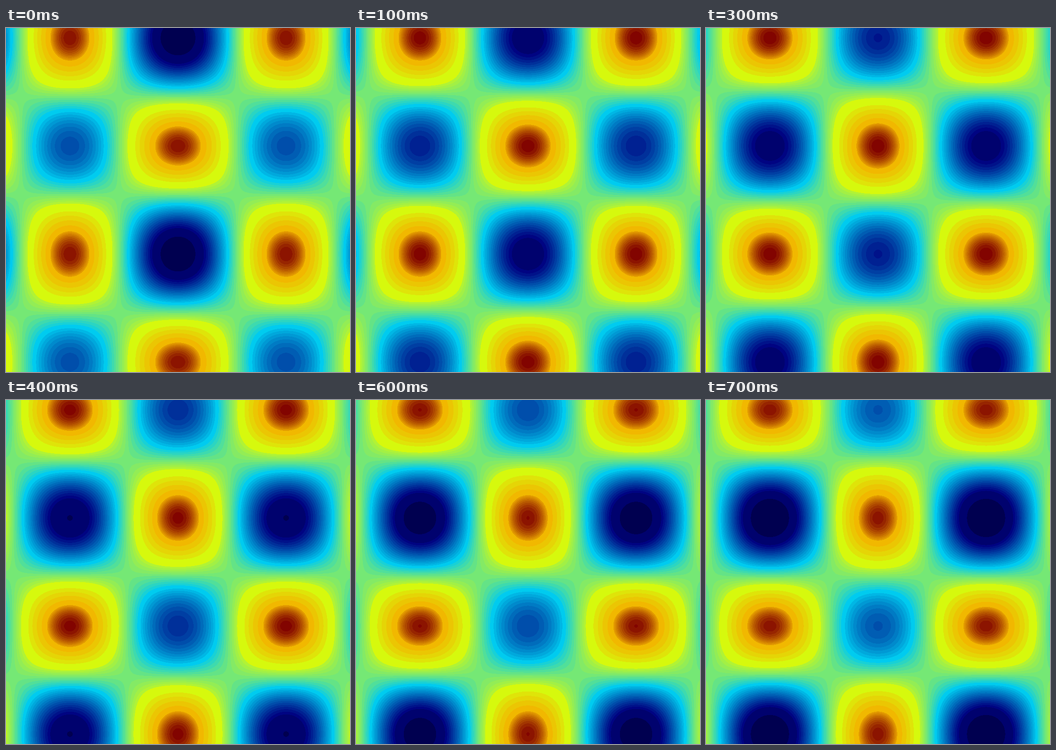
Write a matplotlib script that moves like this. It is 748 px wide and 748 px high and loops after 0.8 s.

```python
import numpy as np
import matplotlib.pyplot as plt
from matplotlib.animation import FuncAnimation
from matplotlib.colors import BoundaryNorm, ListedColormap, to_rgb

SIZE, DPI = 748, 100
FRAMES, INTERVAL = 8, 100
HALF_WIDTH = 5

# Key colours along the field value.
STOPS = {
    -1.25: "#000050",
    -0.975: "#000482",
    -0.31: "#00cbf0",
    0.0: "#76e875",
    0.3: "#d6fa0e",
    0.78: "#f3b400",
    0.99: "#820400",
}


def band_levels():
    """Evenly spaced bands within each colour range, finest near the red peaks."""
    return np.concatenate([
        [-1.5, -1.168],
        np.arange(-1.0, -0.32, 0.05),
        np.arange(-0.27, 0, 0.05),
        np.linspace(0.02, 0.21, 5),
        np.arange(0.4, 0.75, 0.1),
        np.linspace(0.8, 1.0, 11),
    ])


def band_colors(levels):
    middles = (levels[:-1] + levels[1:]) / 2
    channels = zip(*map(to_rgb, STOPS.values()))
    return np.column_stack([np.interp(middles, list(STOPS), c) for c in channels])


def bias(frame):
    """Offset of both waves, drifting ever more slowly."""
    return -0.0033 - 0.175 * np.log((frame + 1.5) / 3.5)


def field(frame):
    a = bias(frame)
    return (np.cos(x) + a) * (np.sin(y) - a)


axis = ((np.arange(SIZE) + 0.5) / SIZE * 2 - 1) * HALF_WIDTH
x, y = np.meshgrid(axis, -axis)

levels = band_levels()
cmap = ListedColormap(band_colors(levels))

fig = plt.figure(figsize=(SIZE / DPI, SIZE / DPI), dpi=DPI)
ax = fig.add_axes([0, 0, 1, 1])
ax.axis("off")
image = ax.imshow(field(0), cmap=cmap, norm=BoundaryNorm(levels, cmap.N),
                  interpolation="nearest", aspect="auto")


def update(frame):
    image.set_data(field(frame))
    return [image]


animation = FuncAnimation(fig, update, frames=FRAMES, interval=INTERVAL,
                          repeat=True, repeat_delay=0, blit=False)
plt.show()
```
